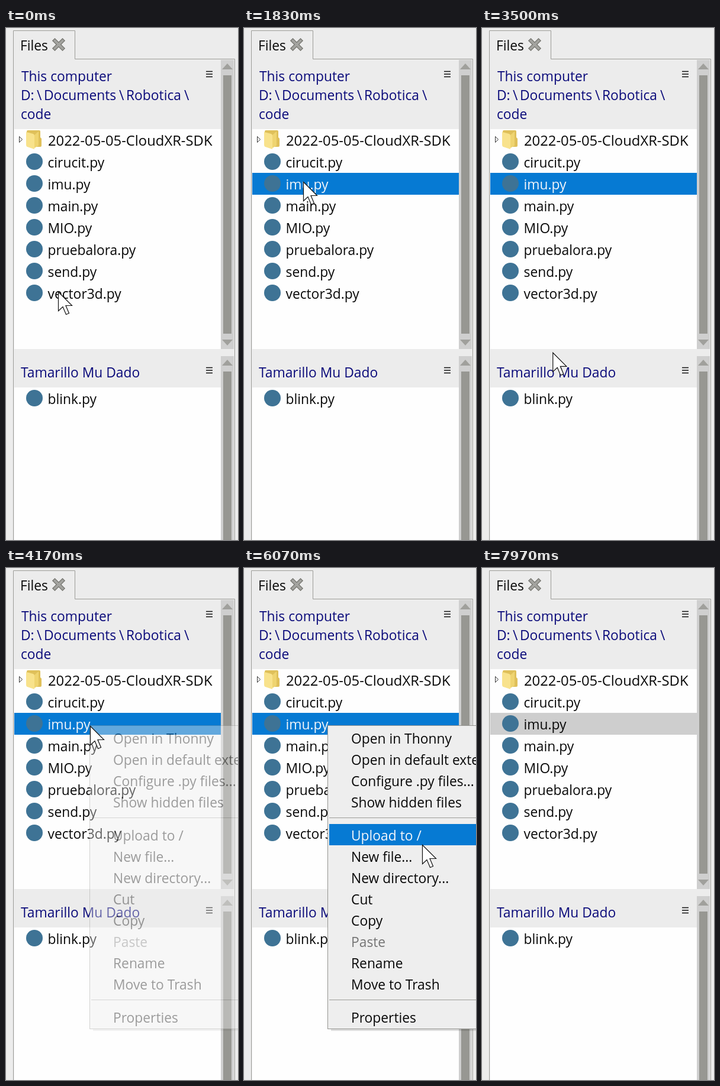
An HTML page that plays this animation: 392 px wide and 866 px high, repeating every 8000 ms.

```html
<!DOCTYPE html>
<html lang="en">
<head>
<meta charset="utf-8">
<title>File panel</title>
<style>
  html, body { margin: 0; width: 100%; height: 100%; overflow: hidden; background: #ececec; }
  svg { display: block; width: 392px; height: 866px; }
  text { font: 22.8px "Open Sans", "Noto Sans", sans-serif; fill: #080808; white-space: pre; }
  .head text { fill: #0a0a7a; }
  .folder { font-size: 23.8px; }
  .list { fill: #fefefe; }
  .line { fill: none; stroke: #9c9c98; }
  .trough { fill: #cfcfcf; }
  .thumb { fill: #979792; }
  .arrow { fill: #a0a09c; }
  .logo { fill: #3e7395; }
  .bars { stroke: #111; stroke-width: 1.7; }
  .off { fill: #757575; }
  .lit { fill: #f4f6fa; }
</style>
</head>
<body>
<svg viewBox="0 0 392 866">
  <rect width="392" height="866" fill="#ececec"/>
  <path d="M12.5 866V4.500H116.500V52.500H386.500V866" class="line"/>
  <text x="24" y="38">Files</text>
  <g stroke-linecap="square">
    <path d="M82.500 21.500l13 13m0-13l-13 13" stroke="#74746e" stroke-width="6.500"/>
    <path d="M82.500 21.500l13 13m0-13l-13 13" stroke="#a3a39f" stroke-width="4"/>
  </g>

  <rect class="list" x="14" y="171" width="349" height="372"/>
  <rect class="list" x="14" y="608" width="349" height="258"/>
  <g class="head">
    <text x="26" y="90">This computer</text>
    <text y="122"><tspan x="25">D:</tspan><tspan x="52">\</tspan><tspan x="64">Documents</tspan><tspan x="191">\</tspan><tspan x="203">Robotica</tspan><tspan x="301">\</tspan></text>
    <text x="25" y="154">code</text>
    <text x="25" y="591">Tamarillo Mu Dado</text>
  </g>
  <path class="bars" d="M338 73.500h11m-11 4.500h11m-11 4.500h11M338 574.500h11m-11 4.500h11m-11 4.500h11"/>

  <rect class="trough" x="363" y="54" width="22" height="489"/>
  <rect class="trough" x="363" y="555" width="22" height="311"/>
  <rect class="thumb" x="367" y="80" width="14" height="437"/>
  <rect class="thumb" x="367" y="581" width="14" height="285"/>
  <path class="arrow" d="M365 70l9-10 9 10zM365 527h18l-9 10zM365 571l9-10 9 10z"/>

  <rect id="selection" x="14" y="245" width="349" height="37"/>
  <path d="M22.500 183.500v10l5-5z" fill="#fff" stroke="#333"/>
  <path d="M35 175q0-2 2-2h19q2 0 2 2v10l2 2v12q0 2-2 2H37q-2 0-2-2z" fill="#dfc05a"/>
  <path d="M34 176l12 3q2 1 2 3v23l-12-4q-2-1-2-3z" fill="#f8e28c"/>
  <path d="M48 181l7-6v24l-7 4z" fill="#efd470"/>
  <g id="files"></g>

  <g id="menu">
    <rect x="147" y="272" width="260" height="511" fill="#000" opacity=".13"/>
    <rect x="141.500" y="266.500" width="270" height="513" fill="#eee" stroke="#949490"/>
    <path d="M144 422.500H392M144 730.500H392" class="line"/>
    <rect id="hover" x="144" width="250" height="36" fill="#067ad3"/>
  </g>
  <path id="cursor" d="M.5.500V32.500L8 25.500 13.500 38.500 18.500 36.500 13 23.500H23.500Z" fill="#fff" stroke="#111" stroke-width="1.200"/>
</svg>
<script>
const LOOP = 8000;
const PICK = 800, OPEN = 4100, CHOOSE = 6900;
const $ = id => document.getElementById(id);

function add(parent, tag, attrs, content = "") {
  const el = document.createElementNS("http://www.w3.org/2000/svg", tag);
  for (const key in attrs) el.setAttribute(key, attrs[key]);
  el.textContent = content;
  return parent.appendChild(el);
}

function addFile(name, top) {
  add($("files"), "circle", { class: "logo", cx: 48, cy: top + 18, r: 14 });
  return add($("files"), "text", { x: 70.5, y: top + 28 }, name);
}

add($("files"), "text", { class: "folder", x: 71, y: 199 }, "2022-05-05-CloudXR-SDK");
const rows = ["cirucit", "imu", "main", "MIO", "pruebalora", "send", "vector3d"]
  .map((name, i) => addFile(name + ".py", 208 + 37 * i));
addFile("blink.py", 608);

// Each group starts at its own top, 36 px per entry.
const groups = [
  [271, "Open in Thonny", "Open in default external app", "Configure .py files...", "Show hidden files"],
  [435, "Upload to /", "New file...", "New directory...", "Cut", "Copy", "Paste", "Rename", "Move to Trash"],
  [743, "Properties"]
];
const items = groups.flatMap(([top, ...names]) => names.map((name, i) => {
  const y = top + 36 * i;
  const el = add($("menu"), "text", { x: 181, y: y + 26 }, name);
  if (name === "Paste") el.classList.add("off");
  return { el, y: y - 2 };
}));

// Pointer stops: time, x, y
const path = [
  [0, 88, 446], [650, 100, 260], [2350, 100, 260], [2670, 95, 499],
  [2950, 108, 689], [3250, 108, 689], [3900, 142, 267], [4300, 142, 267],
  [4730, 178, 306], [5800, 301, 468], [6950, 301, 468], [7450, 420, 440], [LOOP, 420, 440]
];
const clamp = v => Math.max(0, Math.min(1, v));

// Monotone cubic: the pointer glides through stops and rests only at turns.
const secant = (i, axis) => (path[i + 1][axis] - path[i][axis]) / (path[i + 1][0] - path[i][0]);

function slope(i, axis) {
  if (i === 0 || i === path.length - 1) return 0;
  const a = secant(i - 1, axis), b = secant(i, axis);
  return a * b > 0 ? 2 * a * b / (a + b) : 0;
}

function pointer(t) {
  const i = path.findIndex(p => p[0] > t) - 1;
  const span = path[i + 1][0] - path[i][0], k = (t - path[i][0]) / span;
  return [1, 2].map(axis => {
    const from = path[i][axis], to = path[i + 1][axis];
    return from + (to - from) * k * k * (3 - 2 * k)
      + span * k * (1 - k) * (slope(i, axis) * (1 - k) - slope(i + 1, axis) * k);
  });
}

function draw(t) {
  const [x, y] = pointer(t);
  $("cursor").setAttribute("transform", `translate(${x} ${y})`);

  const active = t >= PICK && t < CHOOSE;
  $("selection").setAttribute("fill", t < PICK ? "none" : active ? "#067ad3" : "#cecece");
  rows[1].classList.toggle("lit", active);

  const shown = t < CHOOSE ? clamp((t - OPEN) / 180) : clamp(1 - (t - CHOOSE) / 150);
  $("menu").setAttribute("opacity", shown);
  const over = x > 143 ? items.find(item => y >= item.y && y < item.y + 36) : null;
  for (const item of items) item.el.classList.toggle("lit", item === over);
  $("hover").setAttribute("visibility", over ? "visible" : "hidden");
  if (over) $("hover").setAttribute("y", over.y);
}

const start = performance.now();
function tick() {
  draw((performance.now() - start) % LOOP);
  requestAnimationFrame(tick);
}
tick();
</script>
</body>
</html>
```
